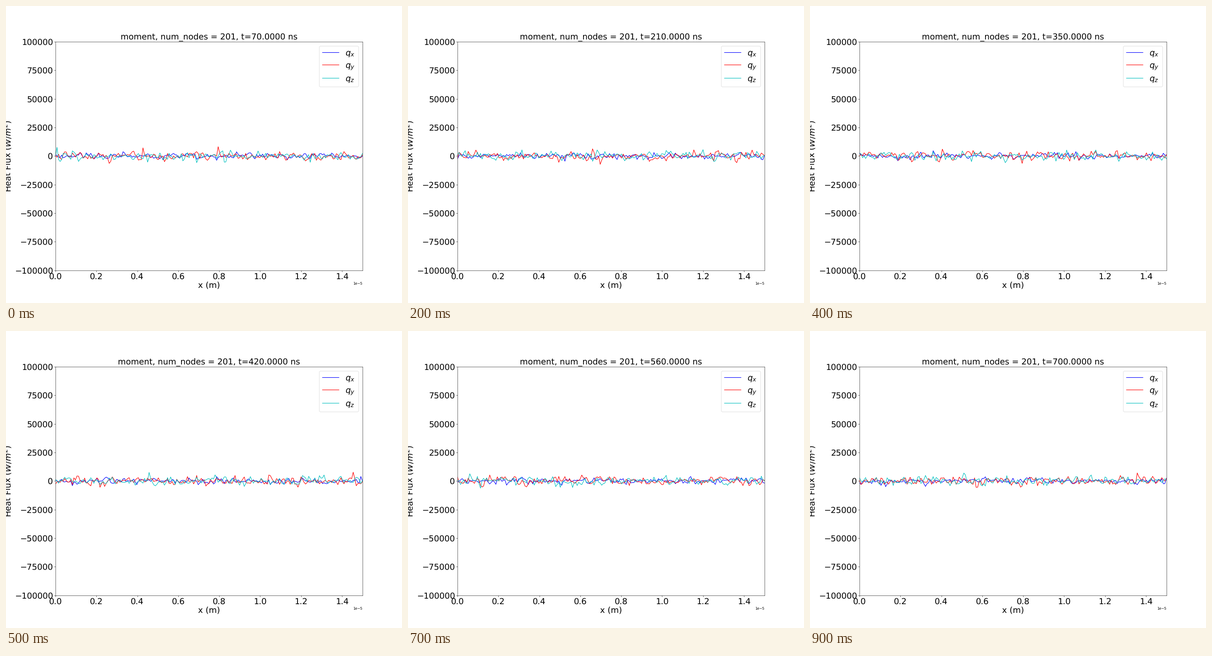
These frames come from a looping animation (864 px wide and 648 px high, 1 s). A matplotlib script:

```python
import numpy as np
import matplotlib.pyplot as plt
from matplotlib.animation import FuncAnimation

FRAMES, INTERVAL = 10, 100
NODES, LENGTH = 201, 1.5e-5
TIME_STEP = 70.0  # ns
FONT = 24
SMOOTHING = 0.35
MAX_FLUX = 8500

# component: (colour, noise level in W/m^2)
SERIES = {"x": ("b", 1350), "y": ("r", 2050), "z": ("c", 2000)}


def noise(rng, level):
    """Return heavy-tailed noise, slightly correlated between nodes."""
    raw = rng.standard_t(df=9, size=NODES + 1)
    smooth = raw[1:] + SMOOTHING * raw[:-1]
    smooth *= level / smooth.std()
    return np.clip(smooth, -MAX_FLUX, MAX_FLUX)


plt.rcParams["text.hinting"] = "no_hinting"
fig, ax = plt.subplots(figsize=(16, 12), dpi=54)
x = np.linspace(0, LENGTH, NODES)
lines = {name: ax.plot(x, np.zeros(NODES), color, label=f"$q_{name}$")[0]
         for name, (color, _) in SERIES.items()}

ax.set_xlim(0, LENGTH)
ax.set_ylim(-100000, 100000)
ax.tick_params(labelsize=FONT)
ax.set_xlabel("x (m)", fontsize=FONT)
ax.set_ylabel("Heat Flux ($W/m^2$)", fontsize=FONT)
ax.legend(loc="upper right", fontsize=FONT, labelspacing=0.42)
title = ax.set_title("", fontsize=FONT, pad=7)


def update(step):
    rng = np.random.default_rng(700 + step)
    for name, (_, level) in SERIES.items():
        lines[name].set_ydata(noise(rng, level))
    time = TIME_STEP * (step + 1)
    title.set_text(f"moment, num_nodes = {NODES}, t={time:.4f} ns")
    return [*lines.values(), title]


anim = FuncAnimation(fig, update, frames=FRAMES, interval=INTERVAL,
                     repeat=True, repeat_delay=0, blit=False)
plt.show()
```
